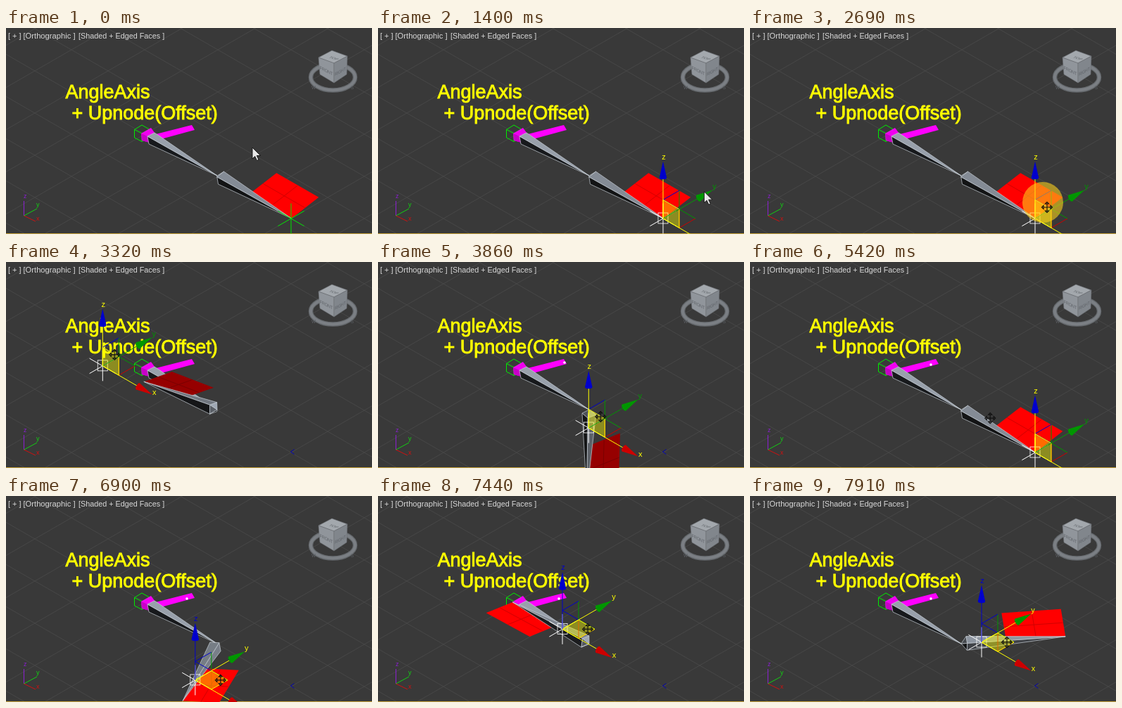
An HTML page that plays this animation: 520 px wide and 293 px high, repeating every 7.99 s.

```html
<!DOCTYPE html>
<html lang="en">
<head>
<meta charset="utf-8">
<title>Bone aim rig</title>
<style>
html, body { margin: 0; width: 100%; height: 100%; overflow: hidden; background: #393939; }
svg { display: block; width: 100%; height: 100%; font-family: "Liberation Sans", Arial, sans-serif; }
</style>
</head>
<body>
<svg viewBox="0 0 520 293" preserveAspectRatio="none">
  <rect width="520" height="293" fill="#393939"/>
  <path id="grid" stroke="#474747" fill="none"/>
  <path d="M0 292.5H520" stroke="#c9a43a"/>
  <g font-size="11" fill="#d8d8d8">
    <text x="3" y="15">[ + ]</text>
    <text x="24.500" y="15" font-size="11.200">[Orthographic ]</text>
    <text x="103" y="15" font-size="10.800">[Shaded + Edged Faces ]</text>
  </g>
  <g id="viewcube">
    <ellipse cx="464.500" cy="70" rx="31.500" ry="18.500" fill="none" stroke="#65696d" stroke-width="6.500"/>
    <ellipse cx="464.500" cy="70" rx="31.500" ry="18.500" fill="none" stroke="#7b7f84" stroke-width="4"/>
    <g stroke="#6c7075" stroke-width=".6">
      <path d="M444 42L463 32L485 40L466 50Z" fill="#a3a8ad"/>
      <path d="M444 42L466 50V78L446 66Z" fill="#90959b"/>
      <path d="M466 50L485 40L484 66L466 78Z" fill="#81868c"/>
    </g>
    <g font-size="6.500" fill="#5d6166" text-anchor="middle">
      <text transform="matrix(.9 .28 -.8 .45 464 44)">TOP</text>
      <text transform="matrix(.82 .4 0 1 455 63)">FRONT</text>
      <text transform="matrix(.78 -.42 0 1 475 64)">RIGHT</text>
      <text x="437" y="87">W</text><text x="492" y="87">S</text>
    </g>
  </g>
  <g id="tripod" fill="none">
    <path d="M25.500 267V246" stroke="#8a1fd0"/>
    <path d="M25.500 267L44 257" stroke="#12d012"/>
    <path d="M25.500 267L42 275" stroke="#d01010"/>
    <g font-size="9">
      <text x="25" y="242" fill="#8a1fd0">z</text>
      <text x="43" y="254" fill="#12d012">y</text>
      <text x="43" y="274" fill="#d01010">x</text>
    </g>
  </g>
  <g font-size="27" fill="#ff0" stroke="#ff0" stroke-width=".9">
    <text x="84.500" y="100">AngleAxis</text>
    <text x="93.500" y="130">+ Upnode(Offset)</text>
  </g>
  <g id="upper" stroke-linejoin="round">
    <path d="M182.500 144.500L193 138L203.500 144V156L193 161.500L182.500 156ZM182.500 144.500L193 150L203.500 144M193 150V161" fill="none" stroke="#0e0"/>
    <path d="M209 152L264 138L268 145L213 160Z" fill="#f0f"/>
    <path d="M192 150L206 142L212 150L204 163L193 160Z" fill="#f000f0"/>
    <path d="M192 150L201 154L204 163L193 160Z" fill="#c800c8"/>
    <path d="M201 154L203 165L300 210Z" fill="#17191c" stroke="#c8ced6" stroke-width=".7"/>
    <path d="M201 154L211 149L217 153L300 210Z" fill="#98a0ab" stroke="#c8ced6" stroke-width=".7"/>
  </g>
  <g id="live"></g>
</svg>
<script>
const LOOP = 7990, REST = [405, 271], KNEE = [300, 210], LEN = 1.53, TWIST = .17;
const AX = 69, AY = 39.8, AZ = 79.7;
const YELLOW = '#ffff00', RED = '#cc0000', GREEN = '#009600', BLUE = '#0000cc';
const VIEW = [1, -1, 1];
const live = document.getElementById('live');

// [time, x, y]
const dragXZ = [
  [2760, 405, 271], [2960, 365, 185], [3180, 235, 155], [3360, 125, 152], [3540, 190, 215],
  [3700, 262, 240], [3860, 299, 236], [4040, 352, 230], [4200, 346, 168], [4390, 285, 156],
  [4540, 250, 184], [4720, 257.5, 219], [4900, 290, 240], [5100, 324, 237]
];
const dragXY = [
  [5950, 405, 271], [6150, 388, 241], [6350, 382, 270], [6620, 322, 281], [6900, 269, 262],
  [7060, 243, 236], [7280, 238, 201], [7540, 280, 187], [7800, 322, 198], [7910, 329, 208]
];
const tour = [
  [0, 350, 170], [140, 350, 170], [610, 420, 283], [1080, 420, 283], [1450, 470, 225], [1870, 496, 164],
  [2250, 114, 88], [2640, 422, 255]
];
const approach = [[5420, 341, 222], [5850, 441, 271]];

const lerp = (a, b, u) => a + (b - a) * u;
const dot = (a, b) => a[0] * b[0] + a[1] * b[1] + a[2] * b[2];
const mul = (a, k) => a.map(v => v * k);
const add = (...vs) => vs.reduce((a, b) => a.map((v, i) => v + b[i]));
const unit = a => mul(a, 1 / (Math.hypot(...a) || 1));
const cross = (a, b) => [a[1] * b[2] - a[2] * b[1], a[2] * b[0] - a[0] * b[2], a[0] * b[1] - a[1] * b[0]];
const project = ([x, y, z], o) => [o[0] + AX * (x + y), o[1] + AY * (x - y) - AZ * z];

function along(keys, t, smooth) {
  const n = keys.length - 1;
  if (t <= keys[0][0]) return keys[0].slice(1);
  if (t >= keys[n][0]) return keys[n].slice(1);
  const i = keys.findIndex(k => k[0] > t) - 1, a = keys[i], b = keys[i + 1];
  const h = b[0] - a[0], u = (t - a[0]) / h;
  if (!smooth) return [lerp(a[1], b[1], u), lerp(a[2], b[2], u)];
  const p = keys[Math.max(0, i - 1)], q = keys[Math.min(n, i + 2)];
  return [1, 2].map(c => {
    const m0 = (b[c] - p[c]) / (b[0] - p[0]) * h, m1 = (q[c] - a[c]) / (q[0] - a[0]) * h;
    const step = b[c] - a[c];
    return a[c] + u * (m0 + u * (3 * step - 2 * m0 - m1 + u * (m0 + m1 - 2 * step)));
  });
}

const pts = list => list.map(p => p[0].toFixed(1) + ' ' + p[1].toFixed(1)).join('L');
const poly = (list, fill, extra = '') => `<path d="M${pts(list)}Z" fill="${fill}" ${extra}/>`;
const line = (list, color) => `<path d="M${pts(list)}" fill="none" stroke="${color}"/>`;
const label = (s, p, color) =>
  `<text x="${p[0]}" y="${p[1]}" font-size="11" text-anchor="middle" fill="${color}">${s}</text>`;

// Direction from knee to handle, solved inside the dragged plane
function aim(c, flat) {
  const dx = (c[0] - KNEE[0]) / AX, dy = c[1] - KNEE[1];
  if (flat) return unit([(dx + dy / AY) / 2, (dx - dy / AY) / 2, 0]);
  return unit([dx, 0, (AY * dx - dy) / AZ]);
}

// Sideways axis of the bone, rolled by the constant offset
function sideways(d, flat) {
  const s = flat ? [-d[1], d[0], 0] : [0, 1, 0];
  return add(mul(s, Math.cos(TWIST)), mul(cross(d, s), Math.sin(TWIST)));
}

function plate(d, s) {
  const at = (u, v) => project(add(mul(d, LEN - u), mul(s, v)), KNEE);
  const lit = Math.max(0, Math.min(1, cross(d, s)[2] * 1.1));
  const v = Math.round(150 + 105 * lit), edge = `rgb(${v * .82 | 0},0,0)`;
  return poly([at(0, 0), at(.87, 0), at(.87, .57), at(0, .57)], `rgb(${v},0,0)`) +
    line([at(.43, 0), at(.43, .57)], edge) + line([at(0, .285), at(.87, .285)], edge);
}

function bone(d, s) {
  const n = cross(d, s), w = .072, light = unit([.6, .1, .8]);
  const ring = [[1, 1], [1, -1], [-1, -1], [-1, 1]].map(([a, b]) => add(mul(d, .08), mul(s, a * w), mul(n, b * w)));
  const mid = mul(d, .3), tip = mul(d, LEN);
  let out = '';
  for (const apex of [[0, 0, 0], tip])
    ring.forEach((a, i) => {
      const b = ring[(i + 1) % 4];
      let m = unit(cross(add(b, mul(a, -1)), add(apex, mul(a, -1))));
      if (dot(m, add(a, mul(mid, -1))) < 0) m = mul(m, -1);
      if (dot(m, VIEW) <= 0) return;
      const k = Math.max(.12, Math.min(1, .15 + .85 * dot(m, light)));
      const fill = `rgb(${160 * k | 0},${169 * k | 0},${181 * k | 0})`;
      out += poly([a, b, apex].map(p => project(p, KNEE)), fill, 'stroke="#c8ced6" stroke-width=".7" stroke-linejoin="round"');
    });
  return out;
}

function locator(c, on) {
  const color = on ? '#fff' : '#00e600', r = .27;
  const arm = v => line([project(mul(v, -r), c), project(mul(v, r), c)], color);
  const box = on ? `<rect x="${c[0] - 7}" y="${c[1] - 8}" width="14" height="15" fill="none" stroke="#fff" stroke-width=".8"/>` : '';
  return arm([1, 0, 0]) + arm([0, 1, 0]) + arm([0, 0, 1]) + box;
}

function gizmo(c, flat) {
  const h = 1 / 3, P = (x, y, z) => project([x, y, z], c);
  const used = flat ? [1, 1, 0] : [1, 0, 1];
  const base = [RED, GREEN, BLUE], tone = base.map((k, i) => used[i] ? YELLOW : k);
  const sheet = flat ? [P(0, 0, 0), P(h, 0, 0), P(h, h, 0), P(0, h, 0)] : [P(0, 0, 0), P(h, 0, 0), P(h, 0, h), P(0, 0, h)];
  let out = line([P(0, h, 0), P(0, h, h)], GREEN) + line([P(0, h, h), P(0, 0, h)], BLUE) +
    line([P(h, 0, 0), P(h, h, 0)], RED) + line([P(h, h, 0), P(0, h, 0)], GREEN) +
    line([P(h, 0, 0), P(h, 0, h)], RED) + line([P(h, 0, h), P(0, 0, h)], BLUE);
  out += poly(sheet, YELLOW, 'fill-opacity=".42" stroke="#ff0"');
  [[1, 0, 0], [0, 1, 0], [0, 0, 1]].forEach((a, i) => {
    const from = project(mul(a, .73), c), tip = project(mul(a, 1.02), c);
    const dx = tip[0] - from[0], dy = tip[1] - from[1], k = 5.2 / Math.hypot(dx, dy);
    const side = q => [from[0] - dy * k * q, from[1] + dx * k * q];
    const angle = Math.atan2(dy, dx) * 180 / Math.PI;
    out += line([c, from], tone[i]) + poly([side(1), tip, side(-1)], base[i]) +
      `<ellipse rx="2.500" ry="5.200" fill="${base[i]}" transform="translate(${from}) rotate(${angle})"/>`;
  });
  return out + label('x', [c[0] + 73.5, c[1] + 41], tone[0]) +
    label('y', [c[0] + 73, c[1] - 42], tone[1]) + label('z', [c[0] + 1, c[1] - 84], tone[2]);
}

const arrow = p => `<path transform="translate(${p})" d="M0 0V16L3.700 12.500L6.500 18.500L9 17.400L6.300 11.500H11.500Z" fill="#e8e8e8" stroke="#111" stroke-width=".9"/>`;
const mover = p => `<path transform="translate(${p})" d="M-5 0H5M0 -5V5M-2.500 -5L0 -7.500L2.500 -5ZM-2.500 5L0 7.500L2.500 5ZM-5 -2.500L-7.500 0L-5 2.500ZM5 -2.500L7.500 0L5 2.500Z" fill="none" stroke="#101010" stroke-width="1.100"/>`;
const ball = p => `<circle cx="${p[0] - 6}" cy="${p[1] - 7}" r="29" fill="#ffd21a" fill-opacity=".58"/>`;
const within = (t, a, b) => t >= a && t < b;

function render(t) {
  const flat = t >= 5780, picked = t >= 1080;
  const first = within(t, 2760, 5420), second = t >= 5950;
  const c = first ? along(dragXZ, t, true) : second ? along(dragXY, t, true) : REST;
  let cur = along(t < 5420 ? tour : approach, t);
  if (first) cur = [c[0] + 17, c[1] - 16];
  if (second) cur = [c[0] + 36, c[1]];

  const d = first || second ? aim(c, second) : [1, 0, 0];
  const s = sideways(d, second);
  let out = plate(d, s) + bone(d, s) + locator(c, picked);
  if (first || second) out += line([[409.5, 266.5], [404.5, 270], [409.5, 273.5]], '#0000b4');
  if (t >= 3500) out += `<circle cx="${t < 4200 ? 265 : 257}" cy="${t < 4200 ? 143 : 146}" r="1.800" fill="#fff"/>`;
  if (picked) out += gizmo(c, flat);
  if (within(t, 1080, 1200) || within(t, 2640, 2790) || within(t, 5850, 5990)) out += ball(cur);
  const pointer = t < 910 || within(t, 1250, 2560);
  live.innerHTML = out + (pointer ? arrow(cur) : mover(cur));
}

// Isometric floor, with one crossing under the resting handle
const STEP = 60, SLOPE = AY / AX;
const floorLine = (k, m) => `M0 ${REST[1] + k - m * REST[0]}L520 ${REST[1] + k + m * (520 - REST[0])}`;
let grid = '';
for (let k = -10 * STEP; k <= 10 * STEP; k += STEP) grid += floorLine(k, SLOPE) + floorLine(k, -SLOPE);
document.getElementById('grid').setAttribute('d', grid);

const start = performance.now();
(function tick() {
  render((performance.now() - start) % LOOP);
  requestAnimationFrame(tick);
})();
</script>
</body>
</html>
```
